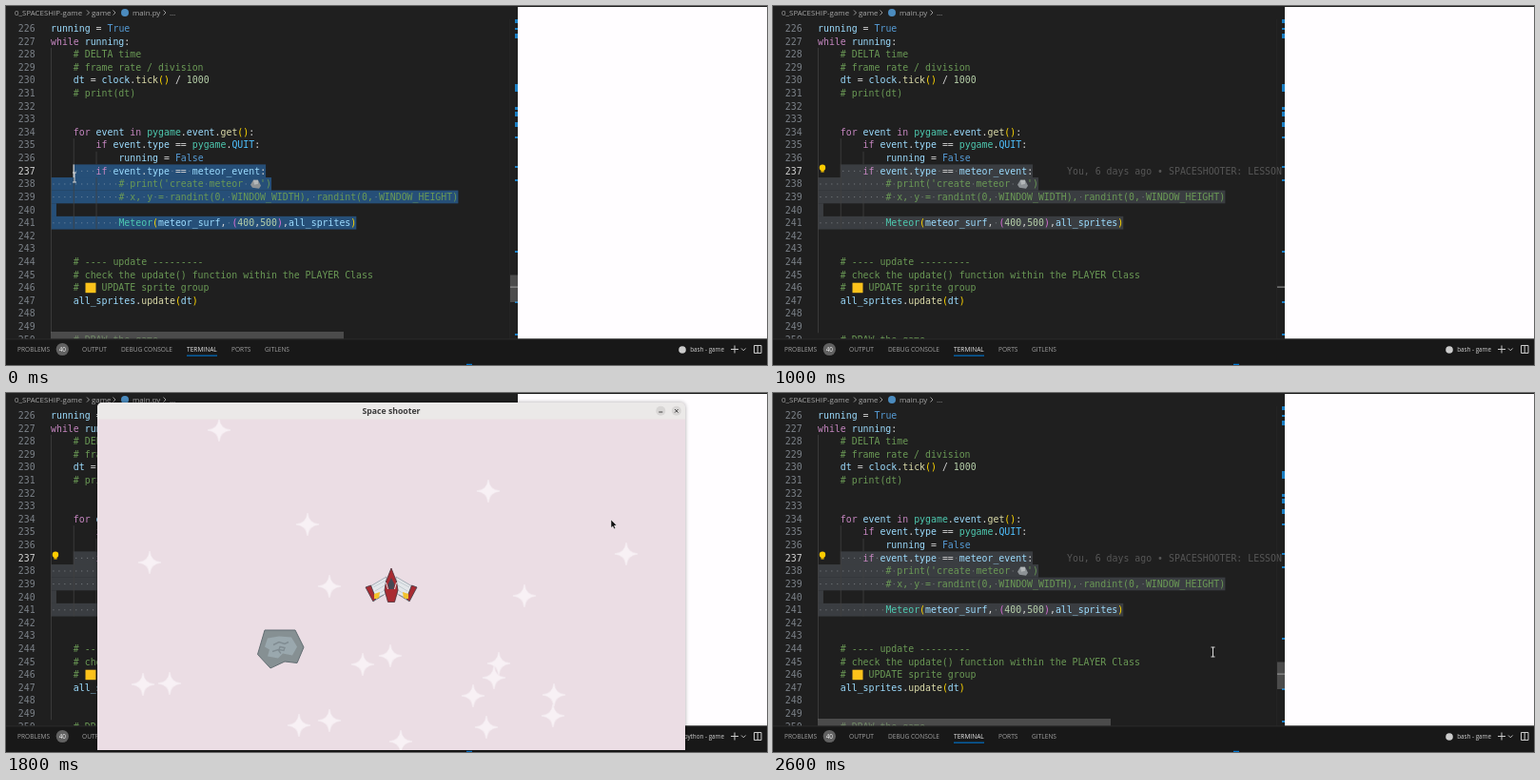
An HTML page with a canvas that plays this animation: 800 px wide and 377 px high, repeating every 2800 ms.

```html
<!DOCTYPE html>
<html lang="en">
<head>
<meta charset="utf-8">
<title>Space shooter</title>
<style>
  html, body { margin: 0; width: 100%; height: 100%; overflow: hidden; background: #1f1f1f; }
  canvas { display: block; }
</style>
</head>
<body>
<canvas id="stage" width="800" height="377"></canvas>
<script>
const canvas = document.getElementById('stage');
const ctx = canvas.getContext('2d');
const LOOP = 2800, STEP = 200;
const CELL = 5.95, LINE = 13.61, LEFT = 47, FIRST = 226, CURRENT = 237;
const MONO = '9.88px "DejaVu Sans Mono", monospace';
const UI = '"Open Sans", "Noto Sans", sans-serif';
const WIN = { x: 96, y: 10, w: 618, h: 365, bar: 17.5 };

// Wide blanks (\u00a0) leave room for the two drawn emoji.
const code = `running = True
while running:
    # DELTA time
    # frame rate / division
    dt = clock.tick() / 1000
    # print(dt)


    for event in pygame.event.get():
        if event.type == pygame.QUIT:
            running = False
        if event.type == meteor_event:
            # print('create meteor \u00a0\u00a0')
            # x, y = randint(0, WINDOW_WIDTH), randint(0, WINDOW_HEIGHT)

            Meteor(meteor_surf, (400,500),all_sprites)


    # ---- update ---------
    # check the update() function within the PLAYER Class
    # \u00a0\u00a0 UPDATE sprite group
    all_sprites.update(dt)


    # DRAW the game`.split('\n');

const rules = [
  [/^#/, '#6a9955'],
  [/^(while|for|if|in)$/, '#c586c0'],
  [/^(True|False)$/, '#569cd6'],
  [/^(pygame|Meteor)$/, '#4ec9b0'],
  [/^QUIT$/, '#4fc1ff'],
  [/^(tick|get|update)$/, '#dcdcaa'],
  [/^\d/, '#b5cea8'],
  [/^\w/, '#9cdcfe'],
  [/./, '#d4d4d4']
];

const rowY = n => 23.5 + (n - FIRST) * LINE;

function rect(x, y, w, h, fill) {
  ctx.fillStyle = fill;
  ctx.fillRect(x, y, w, h);
}
function disc(x, y, r, fill) {
  ctx.fillStyle = fill;
  ctx.beginPath();
  ctx.arc(x, y, r, 0, 7);
  ctx.fill();
}
function shape(path, fill, stroke, width = 1) {
  const p = new Path2D(path);
  if (fill) { ctx.fillStyle = fill; ctx.fill(p); }
  if (stroke) { ctx.strokeStyle = stroke; ctx.lineWidth = width; ctx.stroke(p); }
}
function text(str, x, y, font, fill, align = 'left') {
  ctx.font = font;
  ctx.fillStyle = fill;
  ctx.textAlign = align;
  ctx.fillText(str, x, y);
}
function at(x, y, draw) {
  ctx.save();
  ctx.translate(x, y);
  draw();
  ctx.restore();
}

function drawTokens(line, y) {
  let depth = 0;
  for (const { 0: token, index } of line.matchAll(/#.*|\w+|[^\s\w]/g)) {
    let fill = rules.find(rule => rule[0].test(token))[1];
    if (token === '(') fill = depth++ ? '#da70d6' : '#ffd700';
    if (token === ')') fill = --depth ? '#da70d6' : '#ffd700';
    text(token, LEFT + index * CELL, y, MONO, fill);
  }
}

function drawSelection(color) {
  for (let n = CURRENT; n <= 241; n++) {
    const line = code[n - FIRST], from = n === CURRENT ? 4 : 0;
    const width = Math.max(line.length - from, 1) * CELL;
    rect(LEFT + from * CELL, rowY(n) - 6.8, width, LINE + .1, color);
    for (let c = from; c < line.length; c++)
      if (line[c] === ' ') rect(LEFT + (c + .4) * CELL, rowY(n) - .4, 1.1, 1.1, 'rgba(200,205,210,.4)');
  }
}

function drawGuide(col, first, last) {
  rect(LEFT + col * CELL, rowY(first) - 6.8, .8, (last - first + 1) * LINE, '#414141');
}

function drawBulb() {
  disc(52, 169.8, 3.2, '#ffcc00');
  rect(50.5, 171.5, 3, 3, '#ffcc00');
  rect(50.7, 173.6, 2.6, 1.2, '#9a7a10');
}

function drawEditor(t) {
  const terminalFocus = t >= 600, scrollbars = t < 800 || t >= 2600;
  rect(0, 0, 538, 350, '#1f1f1f');
  ctx.save();
  ctx.beginPath();
  ctx.rect(0, 0, 538, 349.5);
  ctx.clip();

  drawSelection(terminalFocus ? '#3a3d41' : '#264f78');
  drawGuide(0, 228, 249);
  drawGuide(4, 235, 241);
  drawGuide(8, 236, 236);
  drawGuide(8, 238, 241);
  code.forEach((line, i) => {
    const n = FIRST + i, y = rowY(n) + 3.5;
    text(n, 12.8, y, MONO, n === CURRENT ? '#d0d0d0' : '#7b8188');
    drawTokens(line, y);
  });
  at(262, rowY(238), () => {
    shape('M-5 1L-2-4L3-4L6 2L4 5L-3 4Z', '#8d9296');
    shape('M-2-4L3-4L3 0L-1 1Z', '#b3b7b9');
  });
  rect(83.5, rowY(246) - 5, 11, 10.5, '#fcc21b');

  if (t >= 200) {
    drawBulb();
    text('You, 6 days ago • SPACESHOOTER: LESSON', 309, rowY(CURRENT) + 3.5, MONO, '#565656');
  }
  if (!terminalFocus) rect(70.6, rowY(CURRENT) - 6.8, 1.2, LINE, '#d8d8d8');

  // Overview ruler
  rect(529.5, 14, .6, 336, '#2b2b2b');
  for (const [y, h] of [[14, 4], [23, 2], [29, 5], [82, 8], [106, 3], [111, 5], [122, 5], [137, 2], [168, 2], [182, 2], [257, 2], [310, 2], [344, 2]])
    rect(535, y, 3, h, '#1b7fc4');
  if (scrollbars) {
    rect(530, 282.5, 8, 28.5, 'rgba(121,121,121,.5)');
    rect(47, 342, 308, 8, 'rgba(121,121,121,.5)');
  }
  rect(530, 294.6, 8, 1, '#a0a0a0');
  ctx.restore();

  // Breadcrumbs
  const crumb = '7.9px ' + UI, grey = '#a5a5a5';
  text('0_SPACESHIP-game', 9, 9.8, crumb, grey);
  text('game', 90, 9.8, crumb, grey);
  text('main.py', 133, 9.8, crumb, grey);
  text('…', 172, 9.8, crumb, grey);
  for (const x of [85, 112.5, 165.5]) shape(`M${x} 4.5l2.5 2.5l-2.5 2.5`, null, grey, .9);
  disc(125, 7, 4, '#4b8bbe');
}

function drawPanel(t) {
  rect(0, 350, 800, 27, '#181818');
  rect(0, 349.5, 800, .8, '#2f2f2f');
  const font = '6.6px ' + UI;
  const tabs = { PROBLEMS: 12, OUTPUT: 80, 'DEBUG CONSOLE': 121, TERMINAL: 190, PORTS: 237, GITLENS: 272 };
  for (const name in tabs)
    text(name, tabs[name], 362.6, font, name === 'TERMINAL' ? '#e7e7e7' : '#a0a0a0');
  rect(190, 366.6, 32, 1.1, '#0078d4');
  disc(59.3, 360.5, 6.6, '#616161');
  text('40', 59.3, 362.8, '6.4px ' + UI, '#f8f8f8', 'center');

  const python = t >= 1200 && t < 2600;
  text(python ? 'python - game' : 'bash - game', 755, 362.8, '6.3px ' + UI, '#d0d0d0', 'right');
  disc(python ? 704 : 711, 361, 3.8, '#cccccc');
  shape('M762 360.5h8M766 356.5v8', null, '#cccccc', 1);
  shape('M773 359.5l2.3 2.3l2.3-2.3', null, '#cccccc', .9);
  shape('M786.5 356.5h7.5v8h-7.5zM790.2 356.5v8', null, '#cccccc', 1);
  rect(484, 375.8, 6, 1.2, '#0078d4');
}

function drawTitleBar(title) {
  const { x, y, w, bar } = WIN;
  ctx.fillStyle = '#ebe9e8';
  ctx.beginPath();
  ctx.roundRect(x, y, w, bar, [5, 5, 0, 0]);
  ctx.fill();
  text(title, x + w / 2, 21.8, 'bold 8.7px ' + UI, '#3a3a3a', 'center');
  disc(688.3, 18.8, 5, '#d8d6d5');
  disc(704.8, 18.8, 5, '#d8d6d5');
  shape('M686.3 20h4', null, '#333', .9);
  shape('M703 17l3.6 3.6m0-3.6l-3.6 3.6', null, '#333', .9);
}

// The opening window shows a shrunken see-through copy of the screen behind it.
function drawOpening() {
  const { x, y, w, h, bar } = WIN, top = y + bar;
  ctx.save();
  ctx.transform(.754, 0, 0, .765, 172 - x * .754, 98.3 - y * .765);
  ctx.globalAlpha = .8;
  ctx.drawImage(canvas, x, top, w, h - bar, x, top, w, h - bar);
  ctx.globalAlpha = 1;
  rect(x, top, w, h - bar, 'rgba(20,20,20,.16)');
  ctx.globalAlpha = .83;
  drawTitleBar('pygame window');
  ctx.restore();
}

const stars = [[224, 39], [507, 103], [317, 138], [652, 169], [151, 178], [340, 203], [545, 213],
  [404, 276], [375, 285], [518, 284], [513, 299], [144, 306], [172, 305], [491, 318], [576, 317],
  [575, 339], [308, 349], [340, 344], [505, 351], [415, 366]];

function drawStar() {
  const arms = 'M0-12Q1-1 12 0Q1 1 0 12Q-1 1-12 0Q-1-1 0-12Z';
  shape(arms, '#f8f1f5', 'rgba(248,241,245,.5)', 1.4);
}

function drawWing() {
  shape('M5-9L22 1L17 14L6 9Z', '#e4e7ea', '#8795a0', .7);
  shape('M6-5L19 2M7 0L17 6M7 5L15 10', null, '#b7c0c8', .7);
  shape('M21.5 0L27 2L19 17L16 14Z', '#a92b32', '#3d3d48', .8);
  shape('M12 7L18 9L18 14L13 14Z', '#f4c22d');
  shape('M8 10L19 17', null, '#6f7a84', .8);
}

function drawShip() {
  drawWing();
  ctx.save();
  ctx.scale(-1, 1);
  drawWing();
  ctx.restore();
  shape('M0-18L5.5-4L7 5L3.5 17.5H-3.5L-7 5L-5.5-4Z', '#a92b32', '#4a3039', .8);
  shape('M0-8L3.5-1L2.5 4H-2.5L-3.5-1Z', '#454854');
  shape('M-5.5-3L-3.5 4M5.5-3L3.5 4', null, '#dedfe2', 1);
}

function drawMeteor() {
  shape('M-17-19.5H15L24-1.5L17 15L4 13.5L-11 20.5L-24.5 6Z', '#869093', '#626d72', 1);
  shape('M-14-11L-2-13L11-12L17-2L12 7L2 5L-3 10L-14 8L-12 1L-17-2Z', '#9aa8ae');
  shape('M-8-4L-2-7L4-5L8-7M-9 3L-3 1L0 5M-1-2L4-1L3 2L-2 1Z', null, '#808c92', 1.4);
}

function drawGame(t) {
  const { x, y, w, h, bar } = WIN;
  ctx.save();
  ctx.shadowColor = 'rgba(0,0,0,.35)';
  ctx.shadowBlur = 4;
  ctx.fillStyle = '#ebdde4';
  ctx.beginPath();
  ctx.roundRect(x, y, w, h, [5, 5, 0, 0]);
  ctx.fill();
  ctx.restore();
  ctx.save();
  ctx.beginPath();
  ctx.rect(x, y + bar, w, h - bar);
  ctx.clip();
  for (const [sx, sy] of stars) at(sx, sy, drawStar);
  at(405, 202, drawShip);
  if (t >= 1800) at(289, 268.5, drawMeteor);
  ctx.restore();
  drawTitleBar('Space shooter');
}

function drawPointer(t) {
  if (t < 200 || t >= 2600) {
    const [x, y] = t < 200 ? [72, 180] : [462.5, 272];
    at(x, y, () => shape('M-2-5H2M0-5V5M-2 5H2', null, '#d8d8d8', 1));
  } else if (t >= 1400) {
    const p = Math.min((t - 1400) / 800, 1), ease = p * p * (3 - 2 * p);
    at(569 + 134 * ease, 242 - 218 * ease, () =>
      shape('M0 0V8.6L1.9 6.9L3.3 9.8L4.7 9.1L3.4 6.3L6 6.1Z', '#111', 'rgba(255,255,255,.8)', .6));
  }
}

function draw() {
  const t = Math.floor(performance.now() % LOOP / STEP) * STEP;
  rect(0, 0, 800, 377, '#1f1f1f');
  drawEditor(t);
  rect(538, 1, 262, 348.5, '#fffdff');
  drawPanel(t);
  if (t === 1200) drawOpening();
  if (t >= 1400 && t < 2400) drawGame(t);
  drawPointer(t);
  requestAnimationFrame(draw);
}
draw();
</script>
</body>
</html>
```
